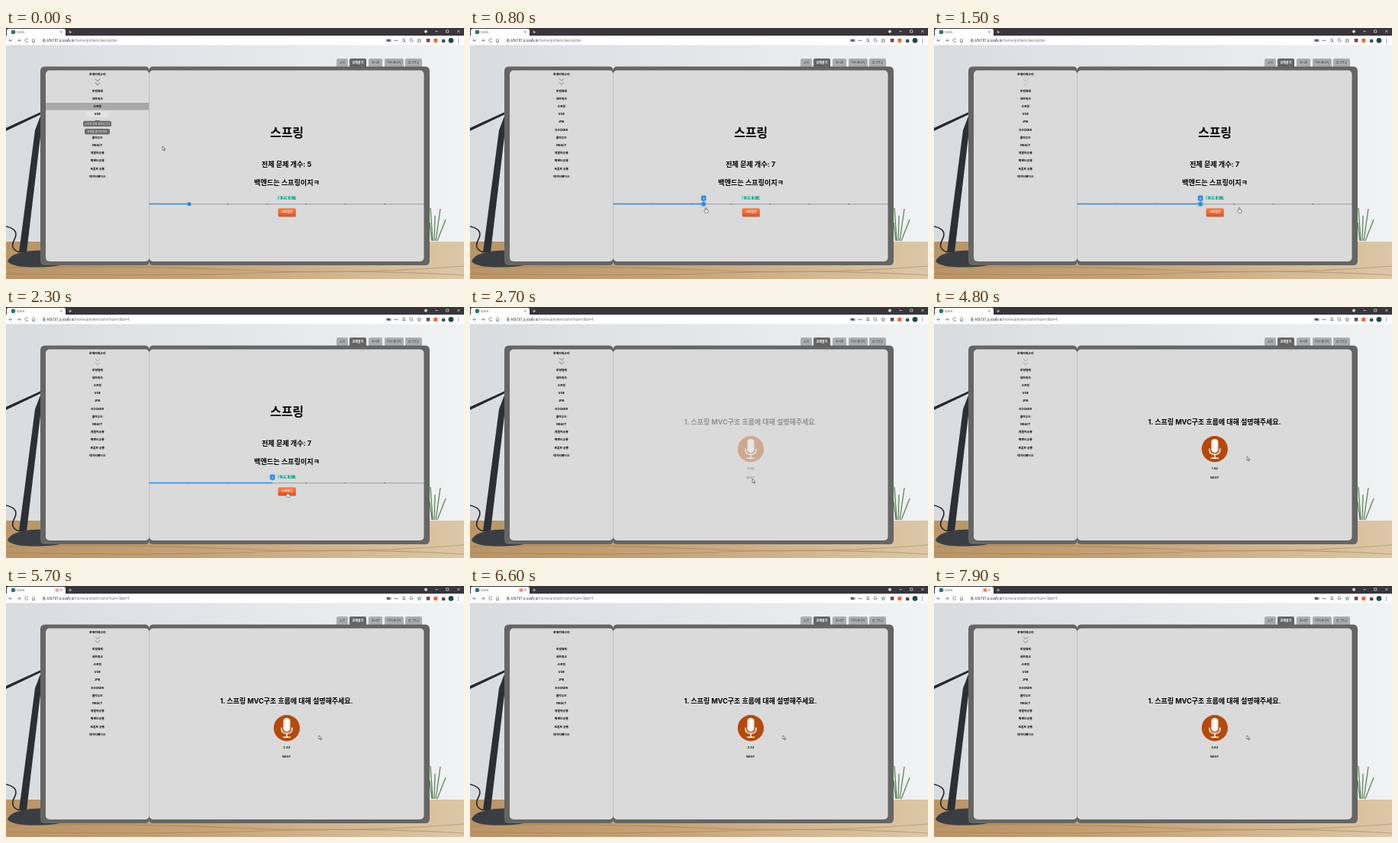
Animation of 600x329 px, one loop 8 s. Source, as an HTML page:

```html
<!DOCTYPE html>
<html lang="ko">
<head>
<meta charset="utf-8">
<title>Quiz</title>
<style>
html, body { margin: 0; width: 100%; height: 100%; overflow: hidden; background: #dfe2e5 }
svg { display: block; width: 100%; height: 100% }
text { font-family: Inter, 'Noto Sans CJK KR', 'Noto Sans CJK', 'Noto Sans', sans-serif }
.mid { text-anchor: middle }
.bold { font-weight: 700 }
.ui { font-family: Roboto, 'Noto Sans', sans-serif }
</style>
</head>
<body>
<svg viewBox="0 0 600 329" preserveAspectRatio="none">
  <defs>
    <linearGradient id="wall"><stop stop-color="#d9dcdf"/><stop offset=".25" stop-color="#dfe2e5"/><stop offset=".6" stop-color="#e6e8ea"/><stop offset="1" stop-color="#f0f2f3"/></linearGradient>
    <linearGradient id="wood"><stop stop-color="#b99467"/><stop offset=".4" stop-color="#c4a176"/><stop offset="1" stop-color="#dcc7a6"/></linearGradient>
    <linearGradient id="orange" x2="0" y2="1"><stop stop-color="#f5824b"/><stop offset="1" stop-color="#e4501c"/></linearGradient>
    <clipPath id="badge"><rect x="356" y="220.6" width="24" height="4.2"/></clipPath>
  </defs>

  <!-- room -->
  <rect y="22" width="600" height="307" fill="url(#wall)"/>
  <path d="M0 280H600V329H0Z" fill="url(#wood)"/>
  <path d="M0 314Q150 310 300 317T600 312M0 322Q200 326 330 321T600 324" fill="none" stroke="#8f6b45" stroke-width="1.2" opacity=".4"/>
  <path d="M0 131L46 110V113L0 135Z" fill="#25282b"/>
  <path d="M46 113V134L27 294H17L38 134Z" fill="#2c3035"/>
  <path d="M0 260Q18 264 11 277T18 294" fill="none" stroke="#25282b" stroke-width="1.6"/>
  <path d="M2 306Q6 293 42 291.5Q78 292 86 304Q78 313 42 313.5Q8 314 2 306" fill="#3a3e43"/>
  <g stroke="#62835f" stroke-width="1.3" fill="none">
    <path d="M559 279L556 236M561 279L562 246M563 279L569 237M565 279L576 251M558 279L555 255"/>
  </g>

  <!-- browser -->
  <rect width="600" height="11" fill="#38363a"/>
  <path d="M1 11V3Q1 1 4 1H75Q78 1 78 3V11Z" fill="#fff"/>
  <rect y="10" width="600" height="12.3" fill="#fff"/>
  <circle cx="9.5" cy="5.3" r="2.8" fill="#2f6f72"/>
  <text class="ui" x="13.7" y="6.9" font-size="4" fill="#777">QDRN</text>
  <g id="rec"><circle cx="67" cy="5.3" r="2.6" fill="none" stroke="#d7553c" stroke-width=".6"/><circle cx="67" cy="5.3" r="1.6" fill="#ee5a36"/></g>
  <g stroke="#e4e4e6" stroke-width=".7" fill="none">
    <path d="M82 5.3h4m-2-2v4M562.3 4.6h3.6M576.6 2.8h3.2v3.2h-3.2zM591.3 2.8l3.2 3.2m0-3.2l-3.2 3.2"/>
    <circle cx="550" cy="4.6" r="1.6" fill="#e4e4e6"/>
  </g>
  <g stroke="#55585c" stroke-width=".7" fill="none">
    <path d="M71.2 4l2.4 2.4m0-2.4l-2.4 2.4"/>
    <path d="M8 16.3H4m2-2l-2 2 2 2M15 16.3h4m-2-2l2 2-2 2M28.8 14.8a2.2 2.2 0 1 0 .2 2.4M33.8 16.3l2.2-2 2.2 2m-3.6 0v2.2h2.8v-2.2"/>
    <path d="M48.6 15.8h2.6v2.2h-2.6zm.5 0v-1q.8-1.2 1.6 0v1M502.5 16l1.5-1v3l-1.5-1"/>
    <path d="M499 15h3.5v2.5H499z" fill="#55585c"/>
    <path d="M508 16.3h5m-1 0v1.4M519 14.3h3v3h-3m4 1.5l-1.5-3M532 17.3l1.4 1.5M541.4 14l.7 1.5 1.6.2-1.2 1.2.3 1.6-1.4-.8-1.4.8.3-1.6-1.2-1.2 1.6-.2z"/>
    <circle cx="530.7" cy="15.8" r="1.8"/>
  </g>
  <rect x="550.8" y="14" width="4.6" height="4.6" fill="#6d4a48"/>
  <rect x="560.4" y="14" width="4.8" height="4.8" fill="#f0642a"/>
  <path d="M571 15h1.4q.6-1.6 1.4 0h1.4v1.4q1.5.6 0 1.4V19H571z" fill="#4a4d51"/>
  <circle cx="583" cy="16.3" r="3.4" fill="#1f4a43"/>
  <path d="M592.6 14v1m0 1v1m0 1v1" stroke="#55585c"/>
  <text class="ui" x="54" y="17.9" font-size="4.55" fill="#333">k5c101.p.ssafy.io<tspan id="path" fill="#777"></tspan></text>

  <!-- site frame -->
  <g id="nav"></g>
  <path d="M51 50.5H182Q187 50.5 187.5 55Q188 50.5 193 50.5H549Q555 50.5 555 56.5V305Q555 311 549 311H193Q188 311 187.5 306.5Q187 311 182 311H51Q45 311 45 305V56.5Q45 50.5 51 50.5Z" fill="#656565"/>
  <rect x="52" y="55.5" width="135.7" height="250.5" rx="5" fill="#dadada"/>
  <rect x="187.7" y="55.5" width="359.8" height="250.5" rx="5" fill="#dadada"/>
  <path d="M187.7 60V301.5" stroke="#c6c6c6" stroke-width=".9"/>

  <!-- category list -->
  <rect class="hover" x="52" y="98" width="135" height="9.5" fill="#a9a9a9"/>
  <rect class="hover" x="104" y="109" width="31" height="8" fill="#e2e2e2"/>
  <g id="menu"></g>
  <path id="chevrons" d="M116.7 66.7l3.3 3 3.3-3m-6.6 5l3.3 3 3.3-3" fill="none" stroke="#777" stroke-width="1.1"/>
  <g class="hover" font-size="3.4" fill="#eee">
    <rect x="101" y="121.8" width="37" height="7.4" rx="2" fill="#6d6d6d"/>
    <rect x="103" y="132" width="33" height="7.4" rx="2" fill="#6d6d6d"/>
    <text class="mid" x="119.5" y="126.8">스프링 관련 문제입니다</text>
    <text class="mid" x="119.5" y="137">문제를 풀어보세요</text>
  </g>

  <!-- description page -->
  <g id="intro">
    <text class="mid bold" x="368" y="143" font-size="16">스프링</text>
    <text class="mid bold" x="367.5" y="181.5" font-size="9.1">전체 문제 개수: <tspan id="total"></tspan></text>
    <text class="mid bold" x="368" y="205.7" font-size="9.1">백엔드는 스프링이지ㅋ</text>
    <g clip-path="url(#badge)">
      <rect x="356" y="220" width="24" height="5" fill="#1ba58c"/>
      <text class="mid bold" x="368" y="224.4" font-size="4.6" fill="#fff">풀 문제 수: <tspan id="chosen"></tspan></text>
    </g>
    <path d="M187.5 230.8H547.5" stroke="#8c8c8c" stroke-width=".8"/>
    <path d="M239 230v1.6m51.4-1.6v1.6m51.4-1.6v1.6m51.4-1.6v1.6m51.4-1.6v1.6m51.4-1.6v1.6" stroke="#666"/>
    <path id="fill" stroke="#3595ea" stroke-width="1.5"/>
    <g id="thumb"><circle id="halo" cy="230.8" r="4" fill="#3595ea" opacity=".35"/><circle cy="230.8" r="2.5" fill="#2e86d6"/></g>
    <g id="tip"><path d="M-3.3 220.5q0-1 1-1h4.6q1 0 1 1v5.5l-2 .5-1.3 1.3-1.3-1.3-2-.5z" fill="#358fe0"/><text id="tipText" class="mid" y="224.9" font-size="3.5" fill="#cfe6fa"></text></g>
    <rect x="356.7" y="237" width="23.2" height="11" rx="1.5" fill="#777" opacity=".5"/>
    <rect x="356.5" y="236.2" width="23" height="10.8" rx="1.2" fill="url(#orange)"/>
    <text class="mid bold" x="368" y="243.1" font-size="4.1" fill="#fff">시작하기</text>
  </g>

  <!-- question page -->
  <g id="quiz">
    <text class="mid bold" x="367.5" y="154" font-size="9">1. 스프링 MVC구조 흐름에 대해 설명해주세요.</text>
    <g id="mic">
      <circle cx="367.8" cy="186.2" r="17.1" fill="#b44a0b"/>
      <rect x="363.2" y="173" width="9.2" height="18" rx="4.6" fill="#fff"/>
      <path d="M360.8 185.5v1.5q0 6.3 7 6.3t7-6.3v-1.5M367.8 193v4.7m-5 .5h10" fill="none" stroke="#fff" stroke-width="1.5"/>
      <path d="M363.2 178.5h1.8m-1.8 2.7h1.8m-1.8 2.7h1.8m5.6-5.4h1.8m-1.8 2.7h1.8m-1.8 2.7h1.8" stroke="#b44a0b" stroke-width=".5"/>
    </g>
    <text id="clock" class="mid" x="367.8" y="213" font-size="4.1" font-weight="600"></text>
    <text class="mid" x="367.6" y="225.2" font-size="4.1" font-weight="600">NEXT</text>
  </g>

  <g id="cursor" stroke="#333" stroke-width=".6" fill="#fff">
    <path id="arrow" d="M0 0V5L1.2 4 2.2 6 3.1 5.6 2.2 3.7H3.8Z"/>
    <path id="hand" d="M-.8 3.2V0Q0-.9.8 0V2.2L3 2.7V4.7L2.2 6.3H-.8L-2.5 3.8Q-2 2.6-.8 3.2Z"/>
  </g>
</svg>
<script>
const LOOP = 8000, STEP = 100;
const $ = id => document.getElementById(id);
const set = (id, attrs) => { for (const k in attrs) $(id).setAttribute(k, attrs[k]); };
const clamp = v => Math.max(0, Math.min(1, v));

// Linear interpolation through rows of [time, ...values].
function track(rows, t) {
  const i = rows.findIndex(r => r[0] > t);
  if (i < 0) return rows[rows.length - 1].slice(1);
  const a = rows[i - 1], b = rows[i], p = (t - a[0]) / (b[0] - a[0]);
  return a.slice(1).map((v, j) => v + (b[j + 1] - v) * p);
}

$('menu').innerHTML = ['문제카테고리', '', '운영체제', '네트워크', '스프링', 'VUE', 'JPA', 'DOCKER', '클라우드', 'REACT', '개발자공통', '백엔드공통', '프론트 공통', '데이터베이스']
  .map((s, i) => `<text class="mid bold" x="119.8" y="${i ? 63.2 + i * 10.2 : 62.1}" font-size="3.9">${s}</text>`).join('');

$('nav').innerHTML = [['소개', 433, 15], ['문제풀기', 450, 22], ['게시판', 475, 18], ['마이페이지', 496, 25], ['로그아웃', 523, 22]]
  .map(([s, x, w], i) => {
    const on = i === 1;
    return `<path d="M${x} 51V42q0-2 2-2h${w - 4}q2 0 2 2V51z" fill="${on ? '#656565' : '#aaadaf'}"/>
      <text class="mid ${on ? 'bold' : ''}" x="${x + w / 2}" y="46.8" font-size="4" fill="${on ? '#fff' : '#444'}">${s}</text>`;
  }).join('');

const pointer = [[0, 205, 155], [400, 240, 229], [500, 245, 232], [800, 309, 236], [1200, 347, 237], [1500, 400, 236],
  [1900, 369, 243], [2500, 369, 243], [3100, 372, 190], [3300, 374, 190], [3500, 398.5, 196], [3900, 425, 192], [4400, 410, 196]];
const slide = [[0, 240], [500, 240], [800, 306], [1200, 349]];
const bounce = [[0, 0, .75], [400, 0, .55], [800, -.5, .55], [1000, -7, 1], [1200, -1, .5], [1600, 1, .1], [2300, 1, .35], [2500, 0, .75]];
const micFade = [[0, 1], [2900, 1], [3100, .8], [3500, .8], [3800, 1]];

function draw(t) {
  const [x, y] = track(pointer, t), [knob] = track(slide, t);
  const [dy, glow] = track(bounce, t % 2500);
  const dragging = t >= 500, value = Math.round((knob - 187.5) / 51.4);
  const hand = (t >= 300 && t < 2500) || (t >= 3000 && t < 3400);

  $('path').textContent = t < 2200 ? '/home/problem/description' : '/home/problem/solve?num=3&id=4';
  document.querySelectorAll('.hover').forEach(e => e.setAttribute('opacity', clamp(1 - t / 300)));
  set('chevrons', { transform: `translate(0 ${dy})`, opacity: glow });

  set('intro', { opacity: clamp((2600 - t) / 300) });
  $('total').textContent = Math.min(7, 5 + t / STEP);
  $('chosen').textContent = $('tipText').textContent = value;
  set('fill', { d: `M187.5 230.6H${knob}` });
  set('thumb', { transform: `translate(${knob} 0)`, opacity: t < 1900 ? 1 : 0 });
  set('halo', { opacity: dragging ? .35 : 0 });
  set('tip', { transform: `translate(${knob} 0)`, opacity: dragging ? 1 : 0 });

  set('quiz', { opacity: clamp((t - 2600) / 300) });
  set('mic', { opacity: track(micFade, t)[0] });
  $('clock').textContent = Math.max(0, (t - 3280) / 1000).toFixed(2);

  const pulse = t < 3500 ? 0 : t > 6750 ? 1 : .5 - .5 * Math.cos((t - 3500) / 1300 * 2 * Math.PI);
  set('rec', { opacity: pulse });
  set('cursor', { transform: `translate(${x} ${y})` });
  set('arrow', { opacity: hand ? 0 : 1 });
  set('hand', { opacity: hand ? 1 : 0 });
}

const start = performance.now();
function tick() {
  const t = (performance.now() - start) % LOOP;
  draw(Math.floor(t / STEP) * STEP);
  requestAnimationFrame(tick);
}
tick();
</script>
</body>
</html>
```
